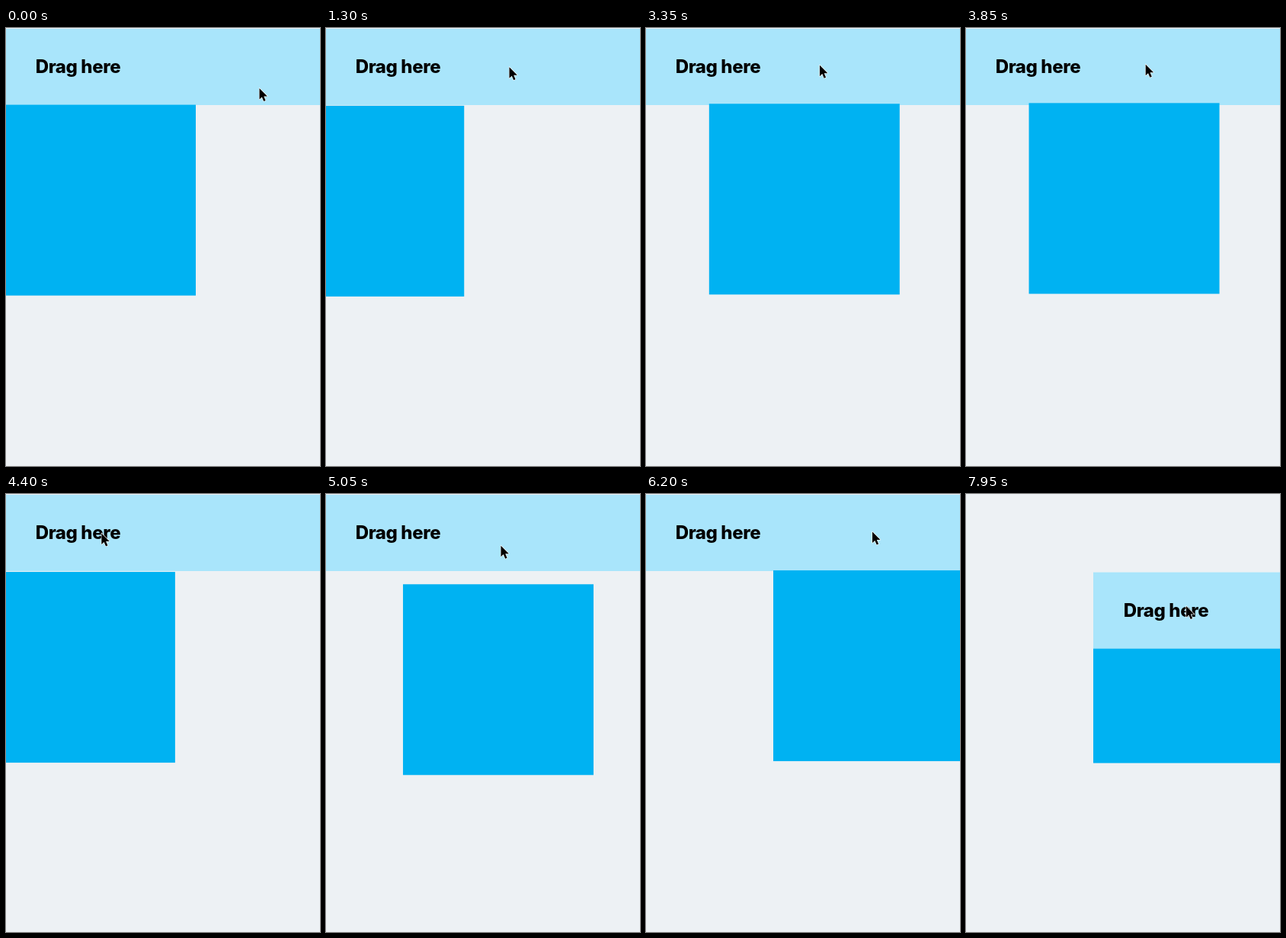
Recreate the animation shown at these times as an HTML page. Size 412 by 574 pixels, loop 8 s.

```html
<!DOCTYPE html>
<html lang="en">
<head>
<meta charset="utf-8">
<title>Drag demo</title>
<style>
  html, body { margin: 0; width: 100%; height: 100%; overflow: hidden; background: #edf1f4; }
  svg { display: block; width: 100%; height: 100%; }
  text { font: 800 24px Inter, Roboto, sans-serif; letter-spacing: -0.4px; }
</style>
</head>
<body>
<svg viewBox="0 0 412 574">
  <rect width="412" height="574" fill="#edf1f4"/>
  <g id="header">
    <rect id="bar" height="100" fill="#a9e5fb"/>
    <text x="39.7" y="58">Drag here</text>
  </g>
  <rect id="box" width="250" fill="#00b2f2"/>
  <path id="cursor" d="M0 0V14.5L3.3 11.4L5.7 17L8.1 16L5.8 10.5H10.4Z" fill="#000" stroke="#fff" stroke-width="1.2" stroke-linejoin="round" paint-order="stroke"/>
</svg>
<script>
const LOOP = 8000, STEP = 50;
const DROP = 6250, DOCK = 7000, REST = 102.6; // release, header snaps back, resting height
const GRIP = 50.6;                            // box top below the pointer

// Turning points of the drag: time, pointer x, pointer y, box x
const turns = [
  [0, 332.5, 50, -1],
  [500, 127, 50, -206],
  [1100, 304, 51, -7],
  [1700, 50, 52, -254],
  [2285, 381, 57.7, 69.5],
  [3080, 100, 48.7, -40],
  [3575, 324, 48.7, 175],
  [4260, 70, 46, -91],
  [4708, 319, 70.7, 192],
  [5404, 135, 64.5, 5],
  [6200, 297, 49.5, 167],
  [6900, 300, -20, 167],
  [7300, 262, -20, 167],
  [7650, 306, 120, 167],
  [7950, 289, 147, 167]
];

const $ = id => document.getElementById(id);
const header = $('header'), bar = $('bar'), box = $('box'), cursor = $('cursor');

const ease = u => (1 - Math.cos(Math.PI * Math.min(u, 1))) / 2;
const mix = (a, b, u) => a + (b - a) * u;
const place = (el, x, y) => el.setAttribute('transform', `translate(${x} ${y})`);

function pose(t) {
  const b = turns.find(p => p[0] > t) || turns[turns.length - 1];
  const a = turns[turns.indexOf(b) - 1];
  const u = ease((t - a[0]) / (b[0] - a[0]));
  return [1, 2, 3].map(c => mix(a[c], b[c], u));
}

function draw(t) {
  const [px, py, x] = pose(t);
  const y = t < DROP ? py + GRIP : REST;
  const docked = t >= DOCK;
  const slip = 29 * (1 - ease(t / 500)); // pointer starts low on the header
  place(cursor, px, py + slip);
  place(header, docked ? x : -1, docked ? y : 1);
  bar.setAttribute('width', docked ? 250 : 414);
  place(box, x, docked ? y + 100 : y);
  box.setAttribute('height', docked ? 150 : 250);
}

const start = performance.now();
function tick() {
  const t = (performance.now() - start) % LOOP;
  draw(Math.floor(t / STEP) * STEP);
  requestAnimationFrame(tick);
}
tick();
</script>
</body>
</html>
```
